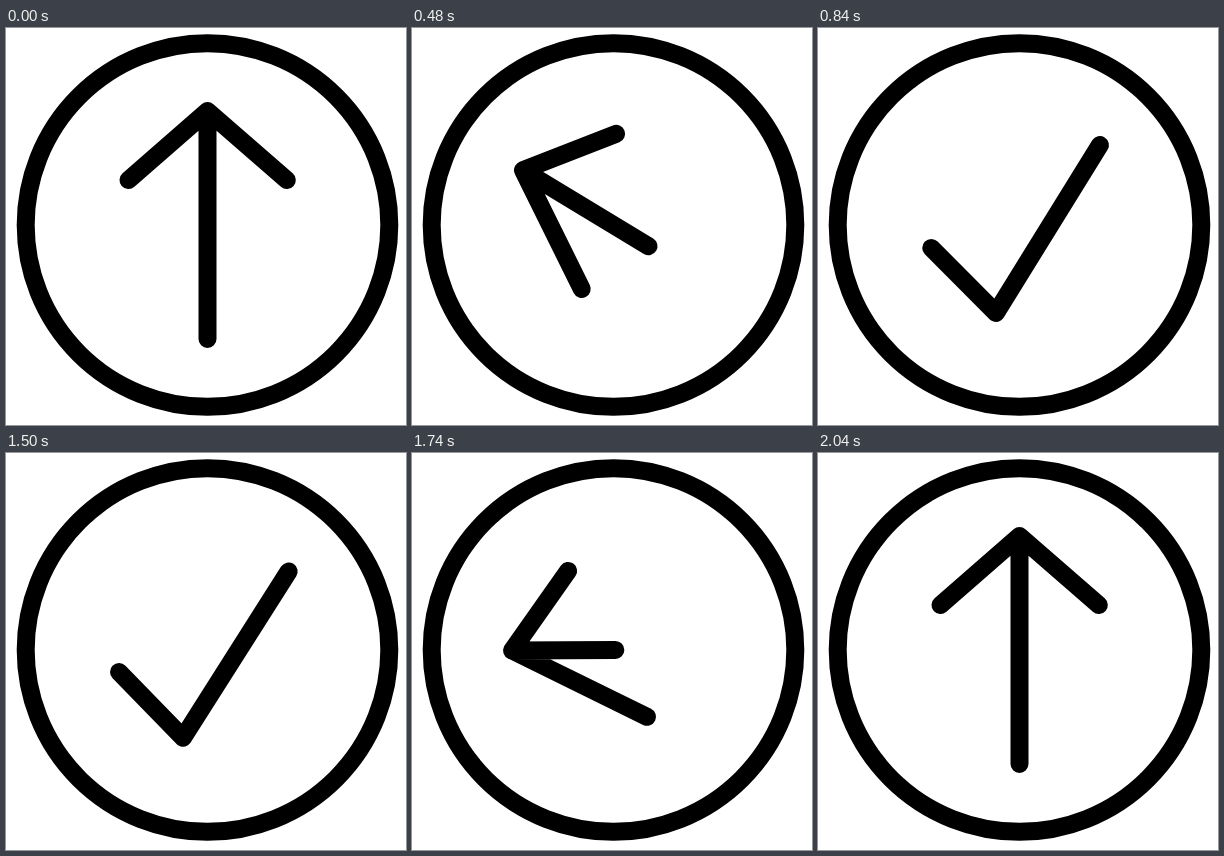
An HTML page that plays this animation: 400 px wide and 397 px high, repeating every 2.28 s.

```html
<!DOCTYPE html>
<html lang="en">
<head>
<meta charset="utf-8">
<title>Arrow to check</title>
<style>
  html, body { margin: 0; height: 100%; overflow: hidden; background: #fff; }
  svg { display: block; width: 100%; height: 100%; }
</style>
</head>
<body>
<svg viewBox="0 0 400 397" fill="none" stroke="#000" stroke-width="18" stroke-linecap="round" stroke-linejoin="round">
  <g transform="translate(201.5 197)">
    <circle r="181.8"/>
    <path id="mark"/>
  </g>
</svg>
<script>
  const LOOP = 2280, STEP = 60, DURATION = 570;
  const TO_CHECK = 234, TO_ARROW = 1467;
  const mark = document.getElementById('mark');

  const lerp = (a, b, p) => a + (b - a) * p;
  const easeIn = u => (2 * u) ** 2.3 / 2;
  const ease = u => u < 0.5 ? easeIn(u) : 1 - easeIn(1 - u);
  const progress = (t, start) => ease(Math.min(1, Math.max(0, (t - start) / DURATION)));

  // p = 0 is the arrow, p = 1 is the check mark
  function draw(p) {
    const tip = lerp(-114, -91, p);
    const shaftEnd = lerp(114, -91, p);
    const leftX = lerp(-79, -57, p);
    const leftY = lerp(-45, 98, p);
    mark.setAttribute('d', `M${leftX} ${leftY}L0 ${tip}L79.3 -45M0 ${tip}V${shaftEnd}`);
    mark.setAttribute('transform', `rotate(${-165 * p})`);
  }

  const origin = performance.now();
  function frame() {
    const elapsed = (performance.now() - origin) % LOOP;
    const t = Math.floor(elapsed / STEP) * STEP;
    draw(progress(t, TO_CHECK) - progress(t, TO_ARROW));
    requestAnimationFrame(frame);
  }
  frame();
</script>
</body>
</html>
```
